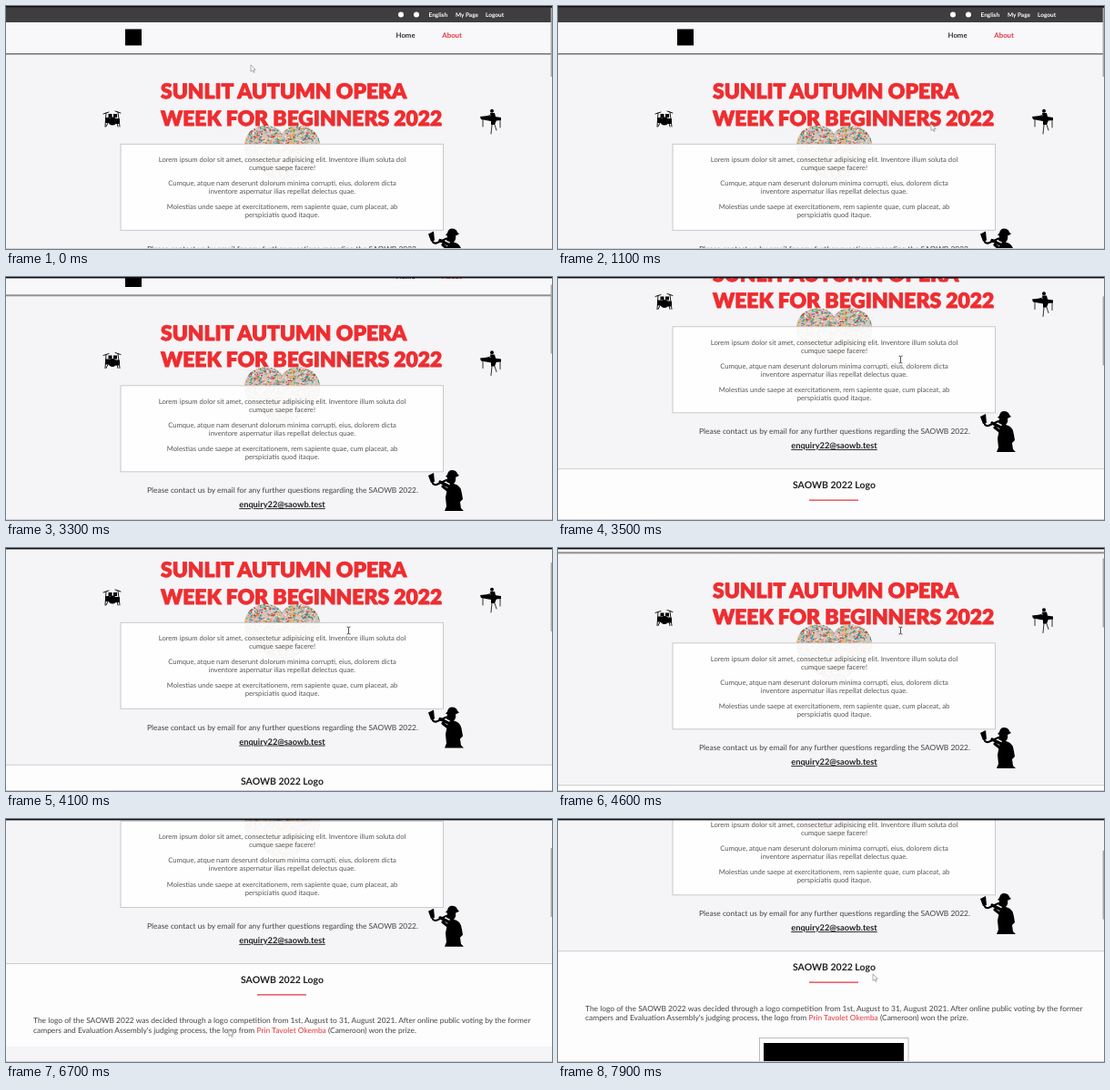
Write an HTML page that moves like this. It is 600x268 px and loops after 8000 ms.

```html
<!DOCTYPE html>
<html lang="en">
<head>
<meta charset="utf-8">
<title>Camp page</title>
<style>
  html, body { margin: 0; width: 100%; height: 100%; overflow: hidden; background: #f5f4f6; }
  svg { display: block; width: 600px; height: 268px; }
  text { font-family: Lato, sans-serif; text-rendering: geometricPrecision; white-space: pre; }
  .title { font-size: 22.8px; font-weight: 900; fill: #ee2d30; stroke: #ee2d30; stroke-width: .9; stroke-linejoin: round; }
  .bar { font-size: 6.5px; font-weight: 700; fill: #fff; }
  .nav { font-size: 7.8px; font-weight: 700; fill: #333; }
  .lorem { font-size: 7.65px; fill: #555; text-anchor: middle; }
  .body { font-size: 8.43px; fill: #444; }
  .mid { text-anchor: middle; }
  .mail { font-size: 9.25px; font-weight: 700; fill: #222; text-decoration: underline; }
  .head { font-size: 10.5px; font-weight: 700; fill: #222; }
  .red { fill: #e2353f; }
  .line { fill: none; stroke: #000; stroke-linecap: round; stroke-linejoin: round; }
</style>
</head>
<body>
<svg viewBox="0 0 600 268">
  <defs>
    <clipPath id="heart">
      <path d="M303.5 141C298 130 276 128 266 141C258 154 262 168 274 178L303.5 200L333 178C345 168 349 154 341 141C331 128 309 130 303.5 141Z"/>
    </clipPath>
    <linearGradient id="shade" x2="0" y2="1">
      <stop stop-color="#666"/><stop offset="1" stop-color="#bbb"/>
    </linearGradient>
  </defs>
  <rect width="600" height="268" fill="#f5f4f6"/>

  <g id="page">
    <rect width="600" height="18" fill="#403d41"/>
    <circle cx="434" cy="9.5" r="3" fill="#fff"/>
    <circle cx="451" cy="9.5" r="3" fill="#fff"/>
    <g class="bar">
      <text x="464.5" y="11.8">English</text>
      <text x="494" y="11.8">My Page</text>
      <text x="527" y="11.8">Logout</text>
    </g>
    <rect y="18" width="600" height="34" fill="#f8f7f9"/>
    <rect y="52" width="600" height="2" fill="url(#shade)"/>
    <rect x="131" y="25.5" width="18" height="18"/>
    <text class="nav" x="428.5" y="34.5">Home</text>
    <text class="nav red" x="479.3" y="34.5">About</text>

    <text class="title" x="170" y="102">SUNLIT AUTUMN OPERA</text>
    <text class="title" x="170" y="131.5">WEEK FOR BEGINNERS 2022</text>

    <g id="mosaic" clip-path="url(#heart)">
      <rect x="255" y="125" width="100" height="80" fill="#d9c3bb"/>
    </g>
    <rect x="126" y="152.3" width="354.5" height="95" fill="#fff" fill-opacity=".92" stroke="#c4c4c6" stroke-width=".9"/>
    <g class="lorem">
      <text x="303.5" y="172">Lorem ipsum dolor sit amet, consectetur adipisicing elit. Inventore illum soluta dol</text>
      <text x="303.5" y="181">cumque saepe facere!</text>
      <text x="303.5" y="198.2">Cumque, atque nam deserunt dolorum minima corrupti, eius, dolorem dicta</text>
      <text x="303.5" y="207.2">inventore aspernatur ilias repellat delectus quae.</text>
      <text x="303.5" y="224.3">Molestias unde saepe at exercitationem, rem sapiente quae, cum placeat, ab</text>
      <text x="303.5" y="233.3">perspiciatis quod itaque.</text>
    </g>

    <g transform="translate(107 115)">
      <circle cx="10" cy="12" r="4.6"/>
      <rect x="2" y="8" width="5" height="6" rx="1"/>
      <rect x="13" y="9" width="5" height="6" rx="1"/>
      <rect x="5.5" y="4" width="4" height="4"/>
      <rect x="11" y="4" width="4" height="4"/>
      <path class="line" stroke-width=".9" d="M0 4L6 2M13 1L19 3M3 3L2 18M16 2L18 18M5 14L3 18M15 14L16 18"/>
    </g>
    <g transform="translate(521 113)">
      <path d="M0 9L9 8L23 10V13L12 14L1 12Z"/>
      <circle cx="13" cy="2.8" r="2"/>
      <path d="M11 5L16 5L18 13L16 18L12 18L12 10Z"/>
      <path class="line" stroke-width=".8" d="M3 12V20M22 13V21M13 18L12 28M16 18L18 24M12 7L7 9"/>
    </g>
    <g transform="translate(464 245.5)">
      <path d="M19 7L21 5Q22 0 26 0Q31 0 32 4L34 6L30 8Q31 12 28 15L31 16Q36 18 37 26L38 32L35 35L36 42L39 45H18L20 40L19 30L21 20L24 15L20 13L21 8Z"/>
      <path class="line" stroke-width="3.2" d="M30 19L25 25L16 18M23 18L13 13"/>
      <path class="line" stroke-width="2" d="M20 11L9 16Q4 17 4 10"/>
      <path d="M0 6L6 3L7 13L3 14Z"/>
    </g>

    <text class="body" x="155" y="270.5">Please contact us by email for any further questions regarding the SAOWB 2022.</text>
    <text class="mail mid" x="303.5" y="286.6">enquiry22@saowb.test</text>

    <rect id="section" y="309" width="600" fill="#fdfdfe"/>
    <path d="M0 309.2H600" stroke="#c8c8ca" stroke-width=".9"/>
    <text class="head mid" x="303.5" y="330.7">SAOWB 2022 Logo</text>
    <path d="M276 343.6H330" stroke="#e2353f" stroke-width="1.1"/>
    <text class="body" x="30" y="375.2">The logo of the SAOWB 2022 was decided through a logo competition from 1st, August to 31, August 2021. After online public voting by the former</text>
    <text class="body" x="30" y="385.6">campers and Evaluation Assembly's judging process, the logo from <tspan class="red">Prin Tavolet Okemba</tspan> (Cameroon) won the prize.</text>
    <g id="logo">
      <rect x="221.5" y="405" width="163.5" height="168" fill="#fff" stroke="#aaa" stroke-width=".8"/>
      <rect x="226" y="410.5" width="154" height="154"/>
    </g>
  </g>

  <rect id="thumb" x="598.6" width="1.4" height="76" fill="#aaa"/>
  <rect width="600" height="1.4" fill="#111"/>
  <rect y="267" width="600" height="1" fill="#d2d1d4"/>
  <path id="arrow" d="M0 0V7.4L1.8 5.8L3 8.4L4.2 7.9L3 5.3H5.3Z" fill="#fff" stroke="#777" stroke-width=".6"/>
  <path id="beam" d="M-2 -4Q0 -4 0 -3Q0 -4 2 -4M0 -3V3M-2 4Q0 4 0 3Q0 4 2 4" fill="none" stroke="#444" stroke-width=".9"/>
</svg>
<script>
const LOOP = 8000, STEP = 100;
const el = id => document.getElementById(id);

// [ms, scroll]
const scrollKeys = [[3200, 0], [3500, 97.5], [3800, 97.5], [4100, 70], [4400, 47.5],
  [5900, 47.5], [6600, 149.7], [6900, 149.7], [7300, 163.5]];
// [ms, x, y]
const mouseKeys = [[0, 269, 65], [300, 200, 105], [600, 330, 140], [900, 480, 95],
  [1300, 340, 165], [1600, 260, 110], [1900, 440, 50], [2100, 453, 11], [2300, 453, 11],
  [2600, 470, 80], [2800, 485, 100], [3000, 376.5, 91], [5000, 376.5, 91],
  [5300, 420, 130], [5700, 194, 225], [5900, 194, 225], [6500, 245, 232],
  [6900, 245, 232], [7700, 346, 171]];

function sample(keys, t) {
  const next = keys.findIndex(k => k[0] > t);
  if (next === 0) return keys[0].slice(1);
  if (next < 0) return keys.at(-1).slice(1);
  const a = keys[next - 1], b = keys[next];
  const p = (t - a[0]) / (b[0] - a[0]);
  return a.slice(1).map((v, i) => v + (b[i + 1] - v) * p);
}

function fillMosaic() {
  let seed = 7;
  const rnd = () => (seed = seed * 16807 % 2147483647) / 2147483647;
  const colors = ['#d8322f', '#2f9a58', '#3f86c0', '#e8b03a', '#f6efe9', '#e8706a', '#4fb8a4'];
  let marks = '';
  for (let i = 0; i < 2000; i++) {
    const x = 260 + rnd() * 87, y = 130 + rnd() * 70;
    const dx = rnd() * 5 - 2.5, dy = rnd() * 3 - 1.5;
    marks += `<path d="M${x} ${y}l${dx} ${dy}" stroke="${colors[i % colors.length]}" stroke-width="1.3"/>`;
  }
  el('mosaic').innerHTML += marks;
}

function draw(now) {
  const t = Math.floor(now % LOOP / STEP) * STEP;
  const [scroll] = sample(scrollKeys, t);
  const [x, y] = sample(mouseKeys, t);
  const overText = t >= 3000 && t < 5200, loaded = t >= 7800;
  el('page').setAttribute('transform', `translate(0 ${-scroll})`);
  el('thumb').setAttribute('y', 2 + scroll * .2);
  el('section').setAttribute('height', loaded ? 300 : 91.5);
  el('logo').style.display = loaded ? '' : 'none';
  for (const id of ['arrow', 'beam']) {
    el(id).setAttribute('transform', `translate(${x} ${y})`);
    el(id).style.display = (id === 'beam') === overText ? '' : 'none';
  }
}

fillMosaic();
const start = performance.now();
(function tick() {
  draw(performance.now() - start);
  requestAnimationFrame(tick);
})();
</script>
</body>
</html>
```
